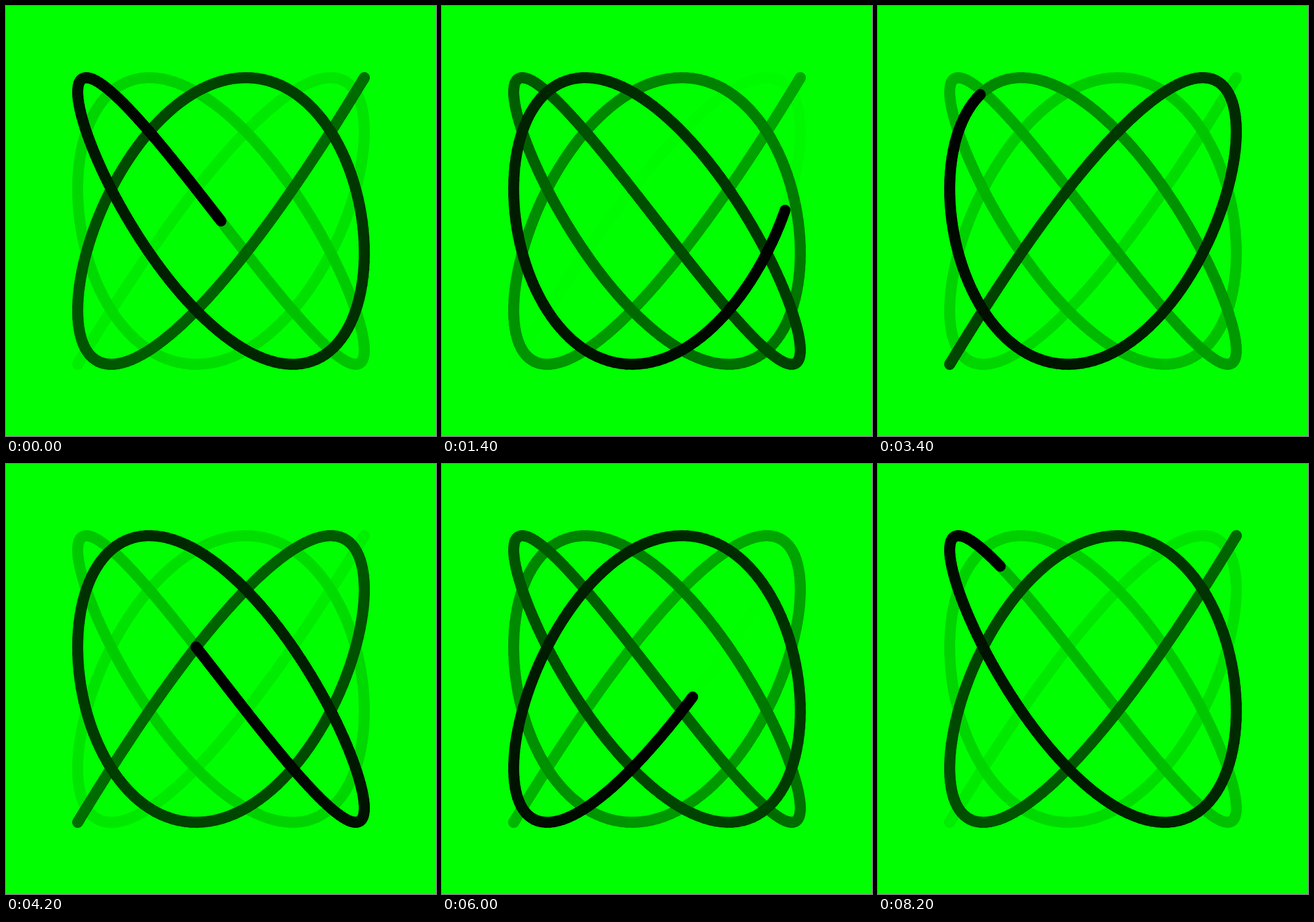
Animation, 748 px wide and 748 px high, one loop 8300 ms. Source, as an HTML page with a canvas:

```html
<!DOCTYPE html>
<html lang="en">
<head>
<meta charset="utf-8">
<title>Fading Lissajous curve</title>
<style>
  html, body { margin: 0; height: 100%; overflow: hidden; background: #0f0; }
  canvas { display: block; width: 748px; height: 748px; }
</style>
</head>
<body>
<canvas id="stage" width="748" height="748"></canvas>
<script>
  const SIZE = 748, MID = SIZE / 2, AMP = SIZE / 3;
  const STEP_MS = 100, STEPS = 83;
  const TURN = 2 * Math.PI, STEP_ANGLE = TURN * 3 / 250;
  const SEGMENTS = 1000;

  const ctx = document.getElementById('stage').getContext('2d');
  ctx.lineWidth = 19;
  ctx.lineCap = 'round';

  const px = a => MID + AMP * Math.sin(7 * a);
  const py = a => MID + AMP * Math.sin(9 * a);

  function draw(step) {
    const head = step * STEP_ANGLE;
    ctx.fillStyle = '#0f0';
    ctx.fillRect(0, 0, SIZE, SIZE);
    // Oldest part first, so newer strokes cover it
    for (let i = 0; i < SEGMENTS; i++) {
      const from = head - TURN * (1 - i / SEGMENTS);
      const to = from + TURN / SEGMENTS;
      const fresh = (i + 1) / SEGMENTS;
      ctx.strokeStyle = `rgb(0, ${Math.round(255 * (1 - fresh * fresh))}, 0)`;
      ctx.beginPath();
      ctx.moveTo(px(from), py(from));
      ctx.lineTo(px(to), py(to));
      ctx.stroke();
    }
  }

  const start = performance.now();
  let shown = 0;

  function tick() {
    const step = Math.floor((performance.now() - start) / STEP_MS) % STEPS;
    if (step !== shown) draw(shown = step);
    requestAnimationFrame(tick);
  }

  draw(0);
  requestAnimationFrame(tick);
</script>
</body>
</html>
```
